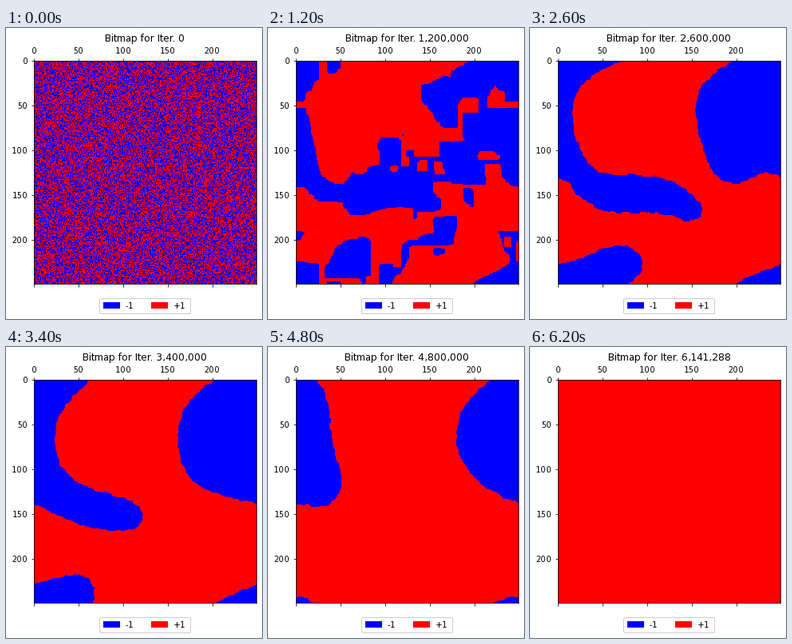
Animation, 321 px wide and 364 px high, one loop 6300 ms. Source, as a matplotlib script:

```python
import numpy as np
import matplotlib.pyplot as plt
from matplotlib.animation import FuncAnimation
from matplotlib.colors import ListedColormap
from matplotlib.patches import FancyBboxPatch, Rectangle
from matplotlib.path import Path

plt.rcParams["text.hinting_factor"] = 1   # whole-pixel glyph advances

W, H, DPI = 321, 364, 72
LEFT, TOP, SIDE = 34.8, 40.8, 279  # lattice on the stage, in pixels
N = 250                            # spins per side
FRAMES, STEP, LAST = 63, 100_000, 6_141_288
MERGED = 18                        # from here on only a few domains remain

# Domain walls at that moment: key points in stage pixels. The large domain
# is unwrapped across the torus seams.
LARGE = [(102, 41), (84, 58), (50, 71), (46, 85), (58, 145), (66, 180),
         (88, 196), (125, 181), (162, 182), (200, 201), (231, 224),
         (238, 245), (226, 276), (207, 285), (207, 252), (190, 230),
         (155, 224), (97, 241), (70, 230), (52, 192), (34, 178), (8, 158),
         (-16, 160), (2, 208), (-18, 226), (-42, 206), (-61, 165),
         (-70, 113), (-86, 92), (-82, 75), (-59, 60), (-24, 41), (8, 24),
         (34, 13), (72, 17), (80, 4), (96, -12), (138, -17), (152, 2),
         (157, 38), (140, 42)]
POCKET = [(238, 93), (268, 83), (306, 97), (312, 121), (285, 111), (246, 104)]
ISLAND = [(134, 148), (161, 130), (188, 148), (161, 167)]

rng = np.random.default_rng(12)
rows, cols = np.indices((N, N))


def smooth_noise(sigma):
    f = np.fft.fftfreq(N)
    kernel = np.exp(-2 * (np.pi * sigma) ** 2 * (f[:, None] ** 2 + f ** 2))
    field = np.fft.ifft2(np.fft.fft2(rng.standard_normal((N, N))) * kernel).real
    return field / field.std()


# Cell centres, slightly warped so that the walls look rough
GX = LEFT + (cols + 0.5) * SIDE / N + 0.7 * smooth_noise(2)
GY = TOP + (rows + 0.5) * SIDE / N + 0.7 * smooth_noise(2)


def spline(points, n=8):
    """Closed Catmull-Rom curve."""
    b = np.array(points, float)[:, None]
    a, c, d = (np.roll(b, s, axis=0) for s in (1, -1, -2))
    u = (np.arange(n) / n)[:, None]
    curve = (2 * b + (c - a) * u + (2 * a - 5 * b + 4 * c - d) * u ** 2
             + (3 * b - a - 3 * c + d) * u ** 3) / 2
    return curve.reshape(-1, 2)


def even(loop, gap=4):
    """Evenly spaced copy of a closed curve, and its length."""
    closed = np.vstack([loop, loop[:1]])
    s = np.r_[0, np.cumsum(np.hypot(*np.diff(closed, axis=0).T))]
    at = np.linspace(0, s[-1], max(8, int(s[-1] / gap)), endpoint=False)
    return np.c_[np.interp(at, s, closed[:, 0]),
                 np.interp(at, s, closed[:, 1])], s[-1]


def shorten(curves, dt=2):
    """Curvature flow; the clock runs slower the more wall there is."""
    clock, history = 0, []
    while True:
        curves = [(c, length) for c, length in map(even, curves) if length > 24]
        history.append((clock, [c for c, _ in curves]))
        if not curves:
            return history
        clock += dt * sum(length for _, length in curves)
        curves = [c + dt * (np.roll(c, 1, 0) - 2 * c + np.roll(c, -1, 0))
                  / (length / len(c)) ** 2 for c, length in curves]


def fill(curves):
    """Cells enclosed by the curves on the torus, even-odd."""
    mask = np.zeros((N, N), bool)
    for curve in curves:
        for dx in (0, SIDE):
            for dy in (0, SIDE):
                x, y = GX - dx, GY - dy
                (x0, y0), (x1, y1) = curve.min(axis=0), curve.max(axis=0)
                box = (x > x0) & (x < x1) & (y > y0) & (y < y1)
                if box.any():
                    points = np.c_[x[box], y[box]]
                    mask[box] ^= Path(curve).contains_points(points)
    return mask


def sweep(spins, goal, pull):
    """Majority of four neighbours; ties lean towards the goal."""
    for parity in (0, 1):
        votes = sum(np.roll(spins, s, axis).astype(np.int8)
                    for s in (1, -1) for axis in (0, 1))
        tie = np.where(rng.random((N, N)) < pull, goal, ~goal)
        new = np.where(votes == 2, tie, votes > 2)
        spins = np.where((rows + cols) % 2 == parity, new, spins)
    return spins


def build_states():
    history = shorten([spline(p) for p in (LARGE, POCKET, ISLAND)])
    clocks = np.array([clock for clock, _ in history])
    times = MERGED + clocks / clocks[-1] * (LAST / STEP - MERGED)
    late = []
    for k in range(MERGED, FRAMES):
        i = np.searchsorted(times, min(k, LAST / STEP))
        late.append(fill(history[min(i, len(history) - 1)][1]))

    spins = rng.random((N, N)) < 0.5
    early, done = [spins], 0
    for k in range(1, MERGED):
        total = round(k + 0.55 * k * k)
        for _ in range(total - done):
            spins = sweep(spins, late[0], 0.5 + 0.5 * (k / MERGED) ** 2)
        done = total
        early.append(spins)
    return early + late


states = build_states()

fig = plt.figure(figsize=(W / DPI, H / DPI), dpi=DPI, facecolor="white")
ax = fig.add_axes([LEFT / W, (H - TOP - SIDE) / H, SIDE / W, SIDE / H])
image = ax.matshow(states[0], cmap=ListedColormap(["red", "blue"]),
                   vmin=0, vmax=1, interpolation="nearest")

stage = fig.add_axes([0, 0, 1, 1])
stage.set(xlim=(0, W), ylim=(H, 0))
stage.axis("off")
title = stage.text(174.5, 17, "", fontsize=12, ha="center", va="baseline")

stage.add_patch(FancyBboxPatch(
    (117.5, 338.5), 114, 19, boxstyle="round,pad=0,rounding_size=2",
    facecolor="white", edgecolor="0.8", linewidth=1))
for x, color, label in ((122, "blue", "-1"), (182, "red", "+1")):
    stage.add_patch(Rectangle((x, 343), 21, 8, facecolor=color, linewidth=0))
    stage.text(x + 28, 351, label, fontsize=10, va="baseline")


def update(k):
    image.set_data(states[k].astype(float))
    title.set_text(f"Bitmap for Iter. {min(k * STEP, LAST):,}")
    return image, title


anim = FuncAnimation(fig, update, frames=FRAMES, interval=100, repeat=True,
                     repeat_delay=0, cache_frame_data=False)
plt.show()
```
